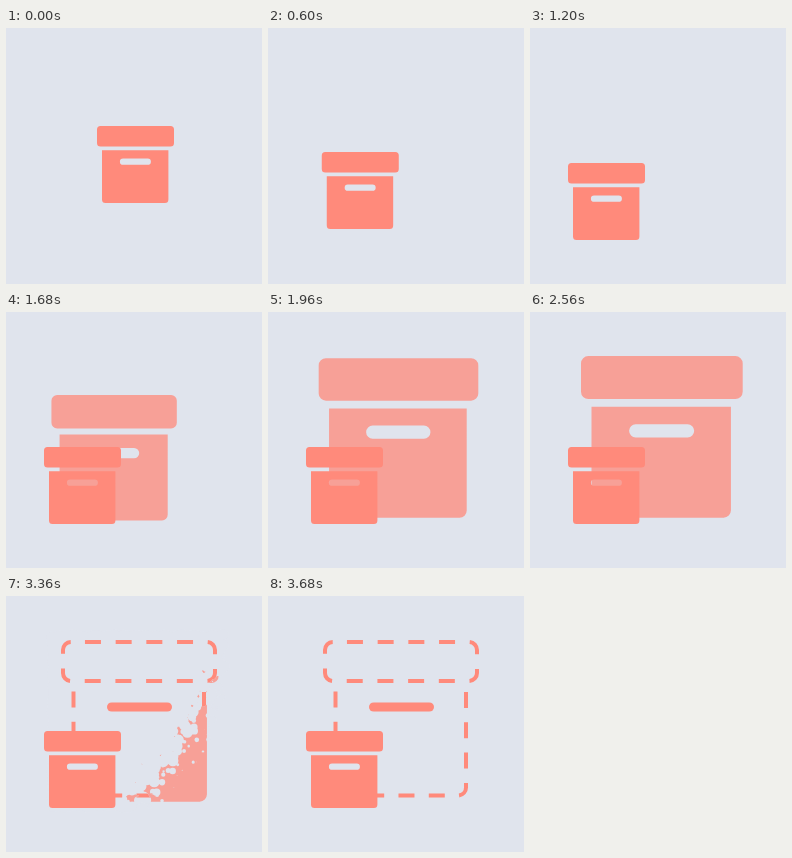
An HTML page with a canvas for the animation above (3880 ms loop, 256 px wide and 256 px high).

```html
<!DOCTYPE html>
<html lang="en">
<head>
<meta charset="utf-8">
<title>Archive box</title>
<style>
  html, body { margin: 0; width: 100%; height: 100%; overflow: hidden; background: #e0e4ed; }
  canvas { display: block; width: 100vw; height: 100vh; }
</style>
</head>
<body>
<canvas id="stage" width="256" height="256"></canvas>
<script>
const LOOP = 3880, BG = '#e0e4ed', CORAL = '#ff8a7b';
const ctx = document.getElementById('stage').getContext('2d');

const lerp = (a, b, p) => a + (b - a) * p;
const span = (t, from, to) => Math.min(1, Math.max(0, (t - from) / (to - from)));
const easeOut = p => 1 - (1 - p) ** 4;
const easeInOut = p => (1 - Math.cos(Math.PI * p)) / 2;

let seed = 7;
const random = () => (seed = seed * 16807 % 2147483647) / 2147483647;

// Holes that eat the large box, opening along a diagonal front
const holes = [];
for (let gy = 40; gy < 212; gy += 5) {
  for (let gx = 47; gx < 218; gx += 5) {
    const x = gx + random() * 3 - 1.5, y = gy + random() * 3 - 1.5;
    holes.push({ x, y, at: x + 0.7 * y + (random() + random() - 1) * 38 });
  }
}

function box(x, y, scale, alpha) {
  ctx.save();
  ctx.translate(x, y);
  ctx.scale(scale, scale);
  ctx.globalAlpha = alpha;
  ctx.fillStyle = CORAL;
  ctx.beginPath();
  ctx.roundRect(0, 0, 77, 20.5, 3.5);
  ctx.roundRect(5, 24.2, 66.4, 52.8, [0, 0, 3.5, 3.5]);
  ctx.roundRect(22.9, 32.5, 31, 6.3, 3.15);
  ctx.fill('evenodd');
  ctx.restore();
}

function dashes(gap, offset, draw) {
  ctx.setLineDash([16, gap]);
  ctx.lineDashOffset = offset;
  ctx.beginPath();
  draw();
  ctx.stroke();
}

function outline() {
  ctx.strokeStyle = ctx.fillStyle = CORAL;
  ctx.lineWidth = 4;
  dashes(14.7, -13.95, () => ctx.roundRect(57, 46, 152, 39, 8));
  dashes(14.3, 0, () => {
    ctx.moveTo(198, 96);
    ctx.arcTo(198, 199.5, 190, 199.5, 8);
    ctx.lineTo(96, 199.5);
    ctx.moveTo(67.5, 95.5);
    ctx.lineTo(67.5, 150);
  });
  ctx.beginPath();
  ctx.roundRect(101, 106.5, 65, 9, 4.5);
  ctx.fill();
}

function dissolve(t) {
  const front = lerp(47, 380, span(t, 2760, 3640));
  ctx.save();
  ctx.beginPath();
  for (const { x, y, at } of holes) {
    const r = 5.5 * span(front, at - 10, at + 14);
    if (r > 0) {
      ctx.moveTo(x + r, y);
      ctx.arc(x, y, r, 0, 7);
    }
  }
  ctx.clip();
  ctx.fillStyle = BG;
  ctx.fillRect(0, 0, 256, 256);
  outline();
  ctx.restore();
}

function render(t) {
  ctx.fillStyle = BG;
  ctx.fillRect(0, 0, 256, 256);
  if (t >= 3660) {
    outline();
  } else if (t > 1250) {
    const grow = easeInOut(span(t, 1250, 2040));
    box(lerp(38, 51, grow), lerp(135, 44, grow), lerp(1, 2.1, grow), 0.75);
    if (t > 2760) dissolve(t);
  }
  const move = easeOut(span(t, 350, 1310));
  box(lerp(91, 38, move), lerp(98, 135, move), 1, 1);
}

const start = performance.now();
function tick() {
  render((performance.now() - start) % LOOP);
  requestAnimationFrame(tick);
}
tick();
</script>
</body>
</html>
```
